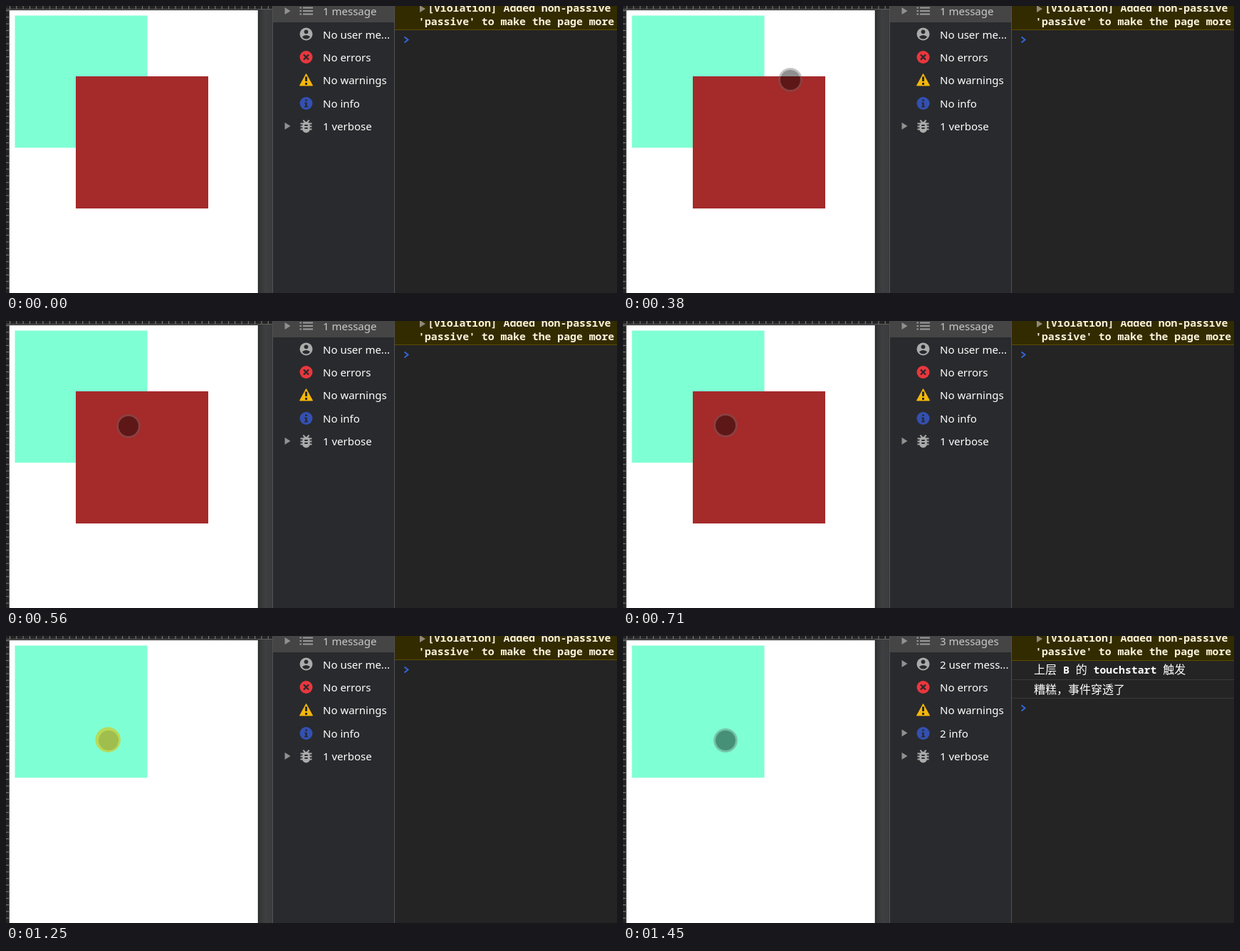
An HTML page for the animation above (2330 ms loop, 858 by 404 pixels).

```html
<!DOCTYPE html>
<html lang="en">
<head>
<meta charset="utf-8">
<title>Touch passes through</title>
<style>
  html, body { margin: 0; width: 100%; height: 100%; overflow: hidden; background: #242424; }
  svg { display: block; }
  text { white-space: pre; }
  .side { font: 500 15px "Noto Sans", "Open Sans", sans-serif; fill: #fff; }
  .log { font: 600 14.8px "Noto Sans Mono", monospace; fill: #fff; }
  .cjk { font: 400 16px "Noto Sans CJK SC", "Noto Sans CJK", sans-serif; }

  .anim { animation: 2330ms step-end infinite; }
  .pointer { animation-name: glide; }
  .dark { animation-name: dark; }
  .tap { animation-name: tap; }
  .top-box { animation-name: vanish; }
  .idle { animation-name: idle; }
  .one { animation-name: one; }
  .logged { animation-name: logged; }
  .two { animation-name: two; }

  @keyframes glide {
    0%, 8.58% { transform: translate(280px, 50px); }
    10.72% { transform: translate(271px, 63px); }
    13.3% { transform: translate(256px, 82px); }
    15.87% { transform: translate(235px, 104px); }
    18.02% { transform: translate(211px, 123px); }
    20.6% { transform: translate(187px, 139px); }
    22.74% { transform: translate(172px, 148px); }
    25.32% { transform: translate(160px, 151px); }
    27.46% { transform: translate(151px, 150px); }
    30.47%, 100% { transform: translate(144px, 147px); }
  }
  @keyframes dark { 0% { opacity: 0 } 8.58% { opacity: 1 } 50.64% { opacity: 0 } 60.08%, 100% { opacity: 1 } }
  @keyframes tap { 0% { opacity: 0 } 50.64% { opacity: 1 } 60.08%, 100% { opacity: 0 } }
  @keyframes vanish { 0% { opacity: 1 } 53.64%, 100% { opacity: 0 } }
  @keyframes idle { 0% { opacity: 1 } 57.93%, 100% { opacity: 0 } }
  @keyframes one { 0% { opacity: 0 } 57.93% { opacity: 1 } 62.23%, 100% { opacity: 0 } }
  @keyframes logged { 0% { opacity: 0 } 57.93%, 100% { opacity: 1 } }
  @keyframes two { 0% { opacity: 0 } 62.23%, 100% { opacity: 1 } }
</style>
</head>
<body>
<svg width="858" height="404" viewBox="0 0 858 404">
  <defs>
    <pattern id="ticksX" x="5" width="9.3" height="6" patternUnits="userSpaceOnUse">
      <path d="M.5 0V4" stroke="#858585"/>
    </pattern>
    <pattern id="ticksY" y="6" width="5" height="9.3" patternUnits="userSpaceOnUse">
      <path d="M0 .5H4" stroke="#858585"/>
    </pattern>
    <linearGradient id="gutter">
      <stop stop-color="#2f3031"/><stop offset=".5" stop-color="#3e3f40"/><stop offset="1" stop-color="#3a3b3c"/>
    </linearGradient>
    <radialGradient id="rim">
      <stop offset=".82" stop-color="#646464" stop-opacity=".44"/>
      <stop offset="1" stop-color="#646464" stop-opacity=".32"/>
    </radialGradient>
    <path id="arrow" d="M0 -5L8 0L0 5Z"/>
    <path id="prompt" d="M559.5 43.5L564.5 47.5L559.5 51.5" fill="none" stroke="#3367d6" stroke-width="2"/>
  </defs>

  <!-- page -->
  <rect width="375" height="404" fill="#242424"/>
  <rect width="374" height="4" fill="url(#ticksX)"/>
  <rect y="6" width="4" height="398" fill="url(#ticksY)"/>
  <rect x="353" y="5" width="22" height="399" fill="url(#gutter)"/>
  <path d="M0 4.5H374M4.5 5V404" stroke="#606060"/>
  <rect x="5" y="6" width="348.75" height="398" fill="#fff"/>
  <path d="M354.5 6V404" stroke="#202020"/>
  <rect x="12.5" y="13.5" width="186" height="186" fill="#7fffd4"/>
  <rect class="anim top-box" x="98" y="99" width="186" height="186" fill="#a52a2a"/>

  <g class="anim pointer">
    <g class="anim dark">
      <path d="M-17 0a17 17 0 1 0 34 0a17 17 0 1 0 -34 0M-14 0a14 14 0 1 1 28 0a14 14 0 1 1 -28 0" fill="url(#rim)" fill-rule="evenodd"/>
      <circle r="14" opacity=".435"/>
    </g>
    <g class="anim tap">
      <circle cx="-.8" cy="-1" r="17.7" fill="#d2c81b" opacity=".67"/>
      <circle r="14" opacity=".13"/>
    </g>
  </g>

  <!-- sidebar -->
  <rect x="374" width="172" height="404" fill="#292a2d"/>
  <rect x="375" width="170" height="23" fill="#454545"/>
  <path d="M374.5 0V404M545.5 0V404" stroke="#505153"/>
  <g fill="#919191">
    <use href="#arrow" x="391.5" y="7"/>
    <use href="#arrow" x="391.5" y="169"/>
    <g class="anim logged">
      <use href="#arrow" x="391.5" y="39"/>
      <use href="#arrow" x="391.5" y="136.5"/>
    </g>
  </g>
  <path d="M412.5 2.5h2.5M412.5 7h2.5M412.5 11.5h2.5M417 2.5h14M417 7h14M417 11.5h14" stroke="#9b9b9b" stroke-width="2"/>
  <g fill="#292a2d">
    <circle cx="421.5" cy="39.5" r="9" fill="#ababab"/>
    <circle cx="421.5" cy="36.3" r="2.9"/>
    <path d="M415.8 43.6Q418 41 421.5 41T427.2 43.6Q425 46.6 421.5 46.6T415.8 43.6Z"/>
    <circle cx="421.5" cy="72" r="9" fill="#e8373e"/>
    <path d="M418 68.5l7 7m0 -7l-7 7" stroke="#292a2d" stroke-width="2.4"/>
    <path d="M421.5 95.5L430.5 112H412.5Z" fill="#f4b70a" stroke="#f4b70a" stroke-linejoin="round"/>
    <path d="M420 99.5h3v6.5h-3zM420 108h3v3h-3z"/>
    <circle cx="421.5" cy="137" r="9" fill="#3350b2"/>
    <path d="M420.3 131.5h2.5v2.5h-2.5zM419.2 135.7h3.6v5.2h1.2v1.6h-5v-1.6h1.3v-3.6h-1.1z"/>
  </g>
  <g stroke="#ababab" stroke-width="2">
    <path d="M413.5 165.5h16M413.5 169.5h16M413.5 173.5h16M417.3 160.8l2.7 2.7M425.7 160.8l-2.7 2.7"/>
    <rect x="417.3" y="164" width="8.4" height="13.5" rx="4" fill="#ababab"/>
    <path d="M419.3 168h4.4M419.3 172h4.4" stroke="#292a2d" stroke-width="1.8"/>
  </g>
  <g class="side">
    <text x="445" y="78">No errors</text>
    <text x="445" y="110">No warnings</text>
    <text x="445" y="175">1 verbose</text>
    <g class="anim idle">
      <text x="445" y="13" fill="#c8c8c8">1 message</text>
      <text x="445" y="46">No user me...</text>
      <text x="445" y="143">No info</text>
    </g>
    <g class="anim one">
      <text x="445" y="13" fill="#c8c8c8">2 messages</text>
      <text x="445" y="46">1 user mess...</text>
      <text x="445" y="143">1 info</text>
    </g>
    <g class="anim two">
      <text x="445" y="13" fill="#c8c8c8">3 messages</text>
      <text x="445" y="46">2 user mess...</text>
      <text x="445" y="143">2 info</text>
    </g>
  </g>

  <!-- console -->
  <rect x="546" width="312" height="404" fill="#242424"/>
  <rect x="546" width="312" height="33" fill="#332b00"/>
  <path d="M546 33.5H858" stroke="#5c4d00"/>
  <use href="#arrow" x="581" y="4" fill="#8f8b78"/>
  <g class="log">
    <g fill="#fbf3dc">
      <text x="592" y="8">[Violation] Added non-passive</text>
      <text x="579" y="27">'passive' to make the page more</text>
    </g>
    <g class="anim logged">
      <rect x="546" y="33" width="312" height="1" fill="#332b00"/>
      <path d="M546 34.5H858" stroke="#5c4d00"/>
      <text x="577" y="53"><tspan class="cjk">上层</tspan> B <tspan class="cjk">的</tspan> touchstart <tspan class="cjk">触发</tspan></text>
      <path d="M546 61.5H858" stroke="#3a3a3a"/>
    </g>
    <g class="anim two">
      <text class="cjk" x="577" y="81">糟糕，事件穿透了</text>
      <path d="M546 87.5H858" stroke="#3a3a3a"/>
    </g>
  </g>
  <g class="anim idle"><use href="#prompt"/></g>
  <g class="anim one"><use href="#prompt" y="27"/></g>
  <g class="anim two"><use href="#prompt" y="54"/></g>
</svg>
</body>
</html>
```
